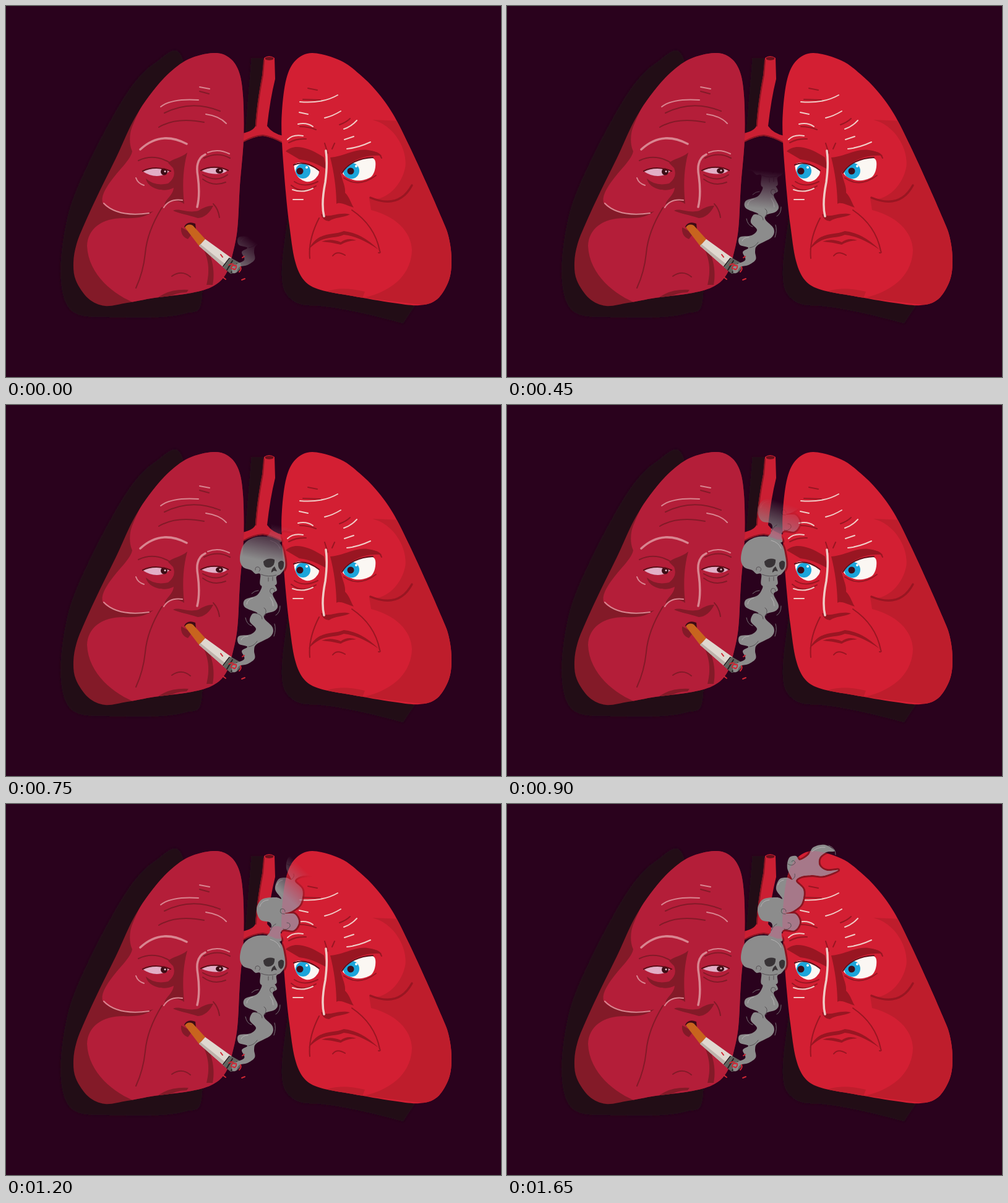
Recreate the animation shown at these times as an HTML page. Size 800 by 600 pixels, loop 2250 ms.

```html
<!DOCTYPE html>
<html lang="en">
<head>
<meta charset="utf-8">
<title>Smoking lungs</title>
<style>
html, body { margin: 0; width: 100%; height: 100%; overflow: hidden; background: #2a021d; }
svg { display: block; width: 100vw; height: 100vh; }
.line { fill: none; stroke-width: 2; stroke-linecap: round; stroke-linejoin: round; }
</style>
</head>
<body>
<svg viewBox="0 0 800 600">
  <defs>
    <!-- data-blob: key points of a smooth closed outline -->
    <path id="lungL" data-blob="335,76 360,83 376,105 383,145 384,215 378,290 374,360 366,402 355,434 335,453 300,464 240,472 196,480 160,485 133,473 113,444 109,415 114,385 127,352 151,300 180,241 205,187 231,146 261,111 295,86"/>
    <path id="lungR" data-blob="495,76 468,88 453,118 446,170 446,220 452,300 458,355 467,412 482,444 508,459 560,469 625,480 668,484 697,474 716,443 720,408 715,372 704,343 680,288 651,225 625,174 599,138 571,110 540,88"/>
    <path id="trail" data-blob="366,431 367,420 385,411 381,398 390,391 376,386 376,374 395,371 404,362 394,350 398,338 406,336 386,327 386,315 405,308 413,296 414,288 430,288 438,299 431,306 439,324 434,333 419,338 418,346 431,360 428,374 405,387 401,397 402,410 390,419 377,422 372,431"/>
    <path id="plume" data-blob="418,220 428,205 427,192 411,187 405,170 414,154 436,151 445,153 435,138 440,122 452,119 461,122 453,104 456,87 467,84 473,91 487,83 495,70 514,66 530,76 516,78 505,87 505,100 517,108 535,107 512,116 494,115 476,117 467,125 479,139 476,161 462,173 450,177 466,178 473,191 465,204 448,203 442,210 444,222"/>
    <path id="skull" data-blob="378,248 384,226 402,214 427,214 444,225 450,245 451,262 444,273 437,278 436,291 412,292 411,274 403,273 396,267 383,262"/>
    <path id="eyeL" data-blob="466,257 480,254 505,266 499,280 485,284 471,275"/>
    <path id="eyeR" data-blob="544,270 562,252 592,246 597,260 589,277 565,282"/>
    <path id="rail" d="M362,428 L400,378 L410,270 L425,194 L460,105 H640"/>
    <clipPath id="inL"><use href="#lungL"/></clipPath>
    <clipPath id="inR"><use href="#lungR"/></clipPath>
    <clipPath id="inEyes"><use href="#eyeL"/><use href="#eyeR"/></clipPath>
    <filter id="soft"><feGaussianBlur stdDeviation="1.500"/></filter>
    <linearGradient id="front" gradientUnits="userSpaceOnUse">
      <stop offset="0" stop-color="#fff"/><stop offset="1" stop-color="#000"/>
    </linearGradient>
    <mask id="reveal" maskUnits="userSpaceOnUse" x="340" y="40" width="220" height="420">
      <rect x="340" y="40" width="220" height="420" fill="url(#front)"/>
    </mask>
  </defs>

  <rect width="800" height="600" fill="#2a021d"/>
  <g fill="#210813" filter="url(#soft)">
    <path data-blob="285,83 240,92 192,145 130,260 98,345 88,440 108,495 175,504 285,499 318,462 300,250"/>
    <path d="M455,340 C447,400 440,440 450,462 C462,482 478,486 500,485 C540,488 590,500 642,514 L662,484 L560,440Z"/>
    <path d="M396,84 H417 L404,198 L386,205Z"/>
  </g>

  <!-- windpipe -->
  <path fill="#cb1f33" d="M417,84 Q425,78 434,84 L435,118 Q427,150 422,194 Q430,206 448,210 V222 Q430,212 415,210 Q400,211 382,221 V206 Q400,202 403,194 Q405,160 414,112Z"/>
  <path class="line" stroke="#8b1622" d="M417,88 L415,112 Q406,160 404,194 M384,219 Q400,210 415,209 Q430,211 447,221"/>
  <ellipse cx="425.500" cy="85" rx="7" ry="2.800" fill="#6b101b"/>

  <!-- left lung -->
  <use href="#lungL" fill="#831a28"/>
  <g clip-path="url(#inL)">
    <path fill="#b41e39" d="M250,60 H400 V500 L212,482 C175,468 133,435 131,388 C132,360 155,343 190,343 Q222,345 238,332 C210,340 165,335 156,318 C153,305 165,287 185,264 Q203,244 204,235 C198,222 200,205 204,195 Q213,172 228,145Z"/>
    <g fill="#831a28">
      <path d="M293,237 C283,246 270,246 262,254 L270,262 Q276,276 262,287 Q240,292 226,279 C230,297 257,302 271,294 C270,306 258,312 256,321 Q274,310 288,320 C286,300 284,270 293,237Z"/>
      <path d="M270,331 C280,326 293,336 311,331 Q325,322 335,323 C330,334 320,343 310,343 C295,338 281,336 270,331Z"/>
      <path d="M313,382 C326,402 331,424 324,451 H334 C339,428 332,398 318,382Z"/>
      <path d="M240,476 Q260,457 295,459 L292,463 Q270,464 262,473Z"/>
      <path d="M283,358 Q282,373 294,377 L301,368Z"/>
    </g>
  </g>
  <g fill="#e2aec6">
    <path d="M221,267 C235,260 252,262 264,267 C255,277 235,278 221,267Z"/>
    <path d="M315,266 C328,260 346,260 358,266 C350,274 330,273 315,266Z"/>
  </g>
  <g fill="#3c0d15"><circle cx="255.500" cy="268" r="5.500"/><ellipse cx="345" cy="266.500" rx="6" ry="4.500"/></g>
  <g fill="#e6bfcd"><circle cx="257" cy="267.500" r="1.500"/><circle cx="346" cy="266" r="1.500"/></g>
  <g class="line">
    <path stroke="#831a28" d="M256,173 Q300,151 346,170 M247,196 Q275,179 320,188 M313,138 L328,142 M252,326 Q228,365 225,400 Q222,430 210,456 M268,437 Q284,426 298,438 M318,273 Q340,286 358,273 M318,280 Q335,293 355,285 M214,250 Q240,238 266,254 M320,246 Q342,235 362,246 M335,320 Q343,328 345,342"/>
    <path stroke="#5e0e18" d="M221,267 C235,260 252,261 266,267 M315,266 C328,259 346,259 359,266"/>
    <path stroke="#d98590" d="M250,163 Q268,149 311,152 M313,131 L329,134 M323,175 Q345,178 356,190 M158,319 Q180,342 231,335 M210,278 Q213,287 223,290 M255,326 Q264,311 285,314 M326,237 Q343,230 361,239"/>
    <path stroke="#d98590" stroke-width="3.500" d="M217,232 Q250,201 292,223 M322,240 Q305,248 310,275 Q314,305 309,325"/>
  </g>

  <!-- right lung -->
  <use href="#lungR" fill="#d31f33"/>
  <g clip-path="url(#inR)">
    <path fill="#be1d2c" d="M592,184 C632,194 652,240 644,266 C636,296 608,318 587,311 L590,330 C630,340 655,365 656,395 C655,430 630,460 578,472 L730,490 V250 L640,186Z"/>
    <path fill="#be1d2c" d="M515,463 Q540,452 580,462 L575,475Z"/>
    <g fill="#991622">
      <path d="M452,235 C465,222 489,228 514,245 L518,264 C507,258 492,250 474,248Z"/>
      <path d="M524,245 C548,243 564,230 585,233 Q600,235 607,242 C582,240 556,248 541,270 C543,282 549,291 548,302 C556,310 558,321 562,326 C550,322 539,316 534,320 C534,300 531,272 524,245Z"/>
      <path d="M509,336 C522,345 536,332 556,337 C544,343 532,341 522,348 Q511,347 509,336Z"/>
      <path d="M489,394 C504,363 528,372 546,364 Q575,367 602,394 Q570,372 546,370 C528,378 512,369 489,394Z"/>
      <path d="M510,381 Q524,375 541,382 Q552,374 566,379 Q550,380 541,386 Q526,382 510,381Z"/>
    </g>
  </g>
  <g fill="#fbf7f3"><use href="#eyeL"/><use href="#eyeR"/></g>
  <g clip-path="url(#inEyes)" fill="#1ca5da"><circle cx="480" cy="267" r="12"/><circle cx="558" cy="266.500" r="13"/></g>
  <g fill="#3a0f1b"><circle cx="475" cy="267" r="5.500"/><circle cx="557" cy="267" r="5.500"/></g>
  <g fill="#fff"><circle cx="486" cy="261" r="2"/><circle cx="566" cy="259" r="2"/></g>
  <g class="line">
    <path stroke="#5e0e18" d="M465,257 C478,251 493,256 506,266 M543,270 C552,254 572,246 593,245"/>
    <path stroke="#991622" d="M488,133 L503,136 M480,151 L508,152 M539,192 Q550,188 556,182 M475,195 Q489,195 501,200 M457,221 Q470,214 485,215 M506,343 Q488,378 491,408 M559,330 Q596,355 604,396 Q606,400 602,399 M528,404 Q535,395 548,403 M466,284 Q482,295 504,284 M461,290 Q478,305 501,291 M546,278 Q570,295 598,274 M515,222 L520,238 M527,231 L531,222 M590,236 Q604,236 607,246"/>
    <path stroke="#991622" stroke-width="3.500" d="M589,310 Q635,329 656,290"/>
    <path stroke="#f0cdc7" d="M475,155 Q512,158 536,144 M515,181 Q528,178 541,170 M546,199 Q558,195 567,185 M472,191 Q486,188 496,195 M455,216 Q464,207 480,210 M547,216 L562,211 M551,231 Q570,229 589,220 M474,172 L488,175 M464,313 L480,313 M463,297 Q480,303 496,295"/>
    <path stroke="#f0cdc7" stroke-width="3.500" d="M517,234 Q520,255 516,285 Q509,320 514,340"/>
  </g>

  <!-- cigarette -->
  <path fill="#3d0b14" d="M288,357 Q293,347 306,352 L307,362 L296,366Z"/>
  <path fill="#c8641e" d="M289,358 Q294,351 302,355 L322,377 L312,388Z"/>
  <path fill="#e0d8d0" d="M322,377 L365,408 L353,424 L312,388Z"/>
  <path fill="#bdb2ab" d="M314,385 L356,419 L353,424 L312,388Z"/>
  <path fill="#62645f" d="M363,407 L379,416 Q382,424 373,431 L363,433 L351,423Z"/>
  <path class="line" stroke="#282326" d="M361,408 L351,421 M366,412 L357,427 M373,417 L364,431"/>

  <!-- smoke -->
  <g mask="url(#reveal)">
    <g clip-path="url(#inR)" fill="none" stroke="#8b1521" stroke-width="6"><use href="#plume"/><use href="#skull"/></g>
    <g fill="#8c8c8c"><use href="#trail"/><use href="#plume"/></g>
    <use href="#plume" fill="#a67889" clip-path="url(#inR)"/>
    <path fill="#a67889" d="M427,200 Q440,194 449,202 Q441,206 445,218 L420,217 Q428,209 427,200Z"/>
    <use href="#skull" fill="#8c8c8c"/>
    <g fill="#383336">
      <path d="M416,253 Q424,246 434,250 Q435,262 424,263 Q416,263 416,253Z"/>
      <path d="M440,255 Q445,249 449,254 Q450,265 444,267 Q439,264 440,255Z"/>
      <path d="M434,261 L438,269 L433,268 L429,271 Q428,266 434,261Z"/>
    </g>
    <g class="line">
      <path stroke="#565155" style="stroke-width:1" d="M403,267 Q402,261 408,262 Q413,265 409,269 M412,274 Q424,279 437,275 M424,279 V285 M431,278 V284 M430,306 Q424,302 428,297 Q434,295 434,301 M403,337 Q414,338 414,346 M392,391 Q401,390 406,382 M418,341 Q423,331 417,328 M427,205 Q430,197 436,194 M450,178 Q441,178 444,170 Q451,168 451,174 M448,202 Q454,205 459,198 Q460,192 454,192 M461,122 Q467,119 465,113 M454,97 Q461,102 466,95 Q464,89 460,93"/>
      <path stroke="#b5b3b4" style="stroke-width:1" d="M389,322 Q390,314 399,312 M380,380 Q382,374 391,374 M427,311 Q432,318 432,325 M427,219 Q439,222 443,232 M410,166 Q413,156 424,155 M438,131 Q440,124 447,123 M493,77 Q502,69 514,70"/>
      <path stroke="#777276" style="stroke-width:1" d="M397,305 Q402,300 408,300 M436,340 Q443,336 443,325 M434,354 Q437,363 433,374 M387,344 Q389,355 397,357 M520,67 Q532,72 531,82"/>
    </g>
  </g>

  <path class="line" stroke="#cf2734" d="M347,402 l3,4 M360,419 q6,-4 8,0 q-6,3 -3,6 M369,420 q4,-2 3,3 q-2,5 -5,2 M379,422 q2,4 -2,8 M351,439 l4,3 M381,443 l5,-2 M385,405 l-3,2"/>
</svg>
<script>
// Smooth closed curve through the key points (Catmull-Rom).
function blob(text) {
  const pts = text.split(" ").map(p => p.split(",").map(Number));
  const at = i => pts[(i + pts.length) % pts.length];
  const handle = (p, a, b) => [p[0] + (b[0] - a[0]) / 6, p[1] + (b[1] - a[1]) / 6];
  const curves = pts.map((p, i) => {
    const next = at(i + 1);
    return `C${handle(p, at(i - 1), next)} ${handle(next, at(i + 2), p)} ${next}`;
  });
  return `M${pts[0]}${curves.join("")}Z`;
}

for (const path of document.querySelectorAll("[data-blob]")) {
  path.setAttribute("d", blob(path.dataset.blob));
}

// The smoke's soft edge advances along the rail in equal hard steps, then rests.
const STEP = 150, LOOP = 2250, LAST = 11, ADVANCE = 38, FADE = 62;
const rail = document.getElementById("rail");
const front = document.getElementById("front");

function draw(time) {
  const step = Math.min(LAST, Math.floor(time % LOOP / STEP));
  const solid = rail.getPointAtLength(step * ADVANCE);
  const edge = rail.getPointAtLength(step * ADVANCE + FADE);
  front.setAttribute("x1", solid.x);
  front.setAttribute("y1", solid.y);
  front.setAttribute("x2", edge.x);
  front.setAttribute("y2", edge.y);
}

let start;
function tick(now) {
  start ??= now;
  draw(now - start);
  requestAnimationFrame(tick);
}
draw(0);
requestAnimationFrame(tick);
</script>
</body>
</html>
```
